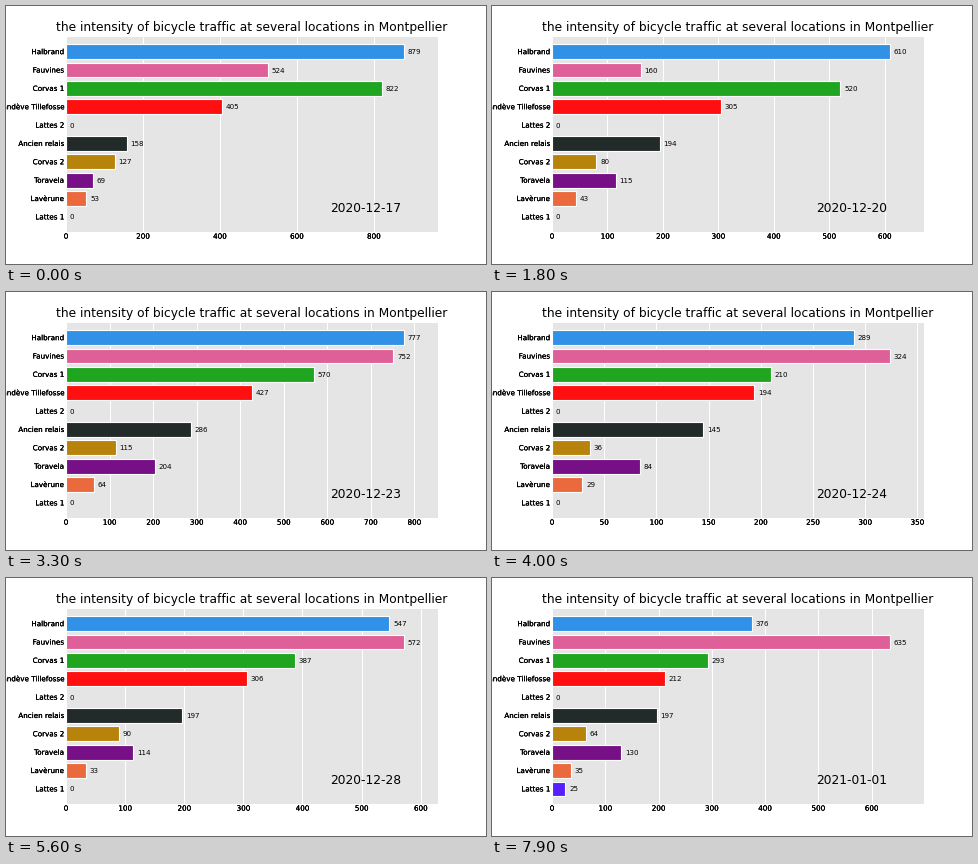
Write a matplotlib script that moves like this. It is 480 px wide and 258 px high and loops after 8000 ms.

```python
import matplotlib.pyplot as plt
import numpy as np
from matplotlib import patheffects
from matplotlib.animation import FuncAnimation

W, H = 480, 258
DPI = 480 / 6.5
STEPS = 5          # drawn steps per day
FRAMES = 80
LEFT, RIGHT, TOP, BOTTOM = 60, 432, 31, 225.6

# Daily counts, one row per station, from 17 December on.
STATIONS = [
    ("Halbrand", "#3091e6", [879, 916, 743, 430, 880, 895, 870, 637, 202,
                             300, 274, 547, 620, 570, 613.3, 187, 502]),
    ("Fauvines", "#df5f98", [524, 0, 0, 0, 400, 857, 845, 612, 252,
                             319, 262, 572, 649, 577, 603.7, 260, 885]),
    ("Corvas 1", "#1fa51f", [822, 860, 622, 360, 760, 703, 650, 450, 150,
                             225, 190, 387, 450, 405, 430, 140, 395]),
    ("Marsandève Tillefosse", "#ff0f0f", [405, 425, 346, 215, 440, 473, 460, 378, 148,
                                          190, 170, 306, 350, 317, 332, 125, 270]),
    ("Lattes 2", "#888888", [0] * 17),
    ("Ancien relais", "#222a2a", [158, 215, 235, 150, 260, 320, 300, 265, 115,
                                  150, 130, 197, 240, 230, 255, 110, 255]),
    ("Corvas 2", "#b8830b", [127, 110, 53, 40, 140, 146, 135, 84, 24,
                             40, 30, 90, 105, 91, 96, 25, 90]),
    ("Toravela", "#770f86", [69, 110, 130, 85, 160, 234, 225, 172, 62,
                             95, 80, 114, 160, 160, 180, 70, 170]),
    ("Lavèrune", "#ea6a3e", [53, 55, 44, 30, 62, 73, 68, 57, 22,
                             28, 22, 33, 46, 46, 51, 20, 45]),
    ("Lattes 1", "#5520ff", [0] * 16 + [42]),
]
names, colors, counts = zip(*STATIONS)
counts = np.array(counts, dtype=float)
rows = np.arange(len(names), 0, -1)


def date_text(day):
    dom = 17 + day
    return f"2020-12-{dom:02d}" if dom <= 31 else f"2021-01-{dom - 31:02d}"


fig = plt.figure(figsize=(W / DPI, H / DPI), dpi=DPI, facecolor="white")
ax = fig.add_axes([LEFT / W, 1 - BOTTOM / H, (RIGHT - LEFT) / W, (BOTTOM - TOP) / H])
ax.set_facecolor("#e5e5e5")
for spine in ax.spines.values():
    spine.set_visible(False)
ax.set_axisbelow(True)
ax.grid(True, axis="x", color="white", lw=1)
ax.set_ylim(0.2, len(names) + 0.8)
ax.set_yticks(rows, names)
ax.tick_params(labelsize=7, length=0, pad=2)
ax.xaxis.set_major_formatter("{x:,.0f}")
ax.set_title("the intensity of bicycle traffic at several locations in Montpellier",
             fontsize=12, pad=6)

bars = ax.barh(rows, counts[:, 0], height=0.8, color=colors, ec="white", lw=1.1)
labels = [ax.text(0, y, "", fontsize=7, va="center_baseline") for y in rows]
date = ax.text(0.9, 0.1, "", transform=ax.transAxes, fontsize=12, ha="right")

# Tick labels are painted several times over, which thickens their edges.
heavy = [patheffects.Normal()] * 3
plt.setp(ax.get_yticklabels(), path_effects=heavy)


def draw(i):
    day, step = divmod(max(i - 1, 0), STEPS)
    f = step / STEPS
    values = counts[:, day] * (1 - f) + counts[:, day + 1] * f
    limit = values.max() * 1.1
    ax.set_xlim(0, limit)
    for bar, label, v in zip(bars, labels, values):
        bar.set_width(v)
        bar.set_visible(v > 0)
        label.set_x(v + limit * 0.01)
        label.set_text(f"{v:,.0f}")
    date.set_text(date_text(day))
    plt.setp(ax.get_xticklabels(), path_effects=heavy)
    return [*bars, *labels, date]


anim = FuncAnimation(fig, draw, frames=FRAMES, interval=100, repeat=True,
                     repeat_delay=0, blit=False)
plt.show()
```
